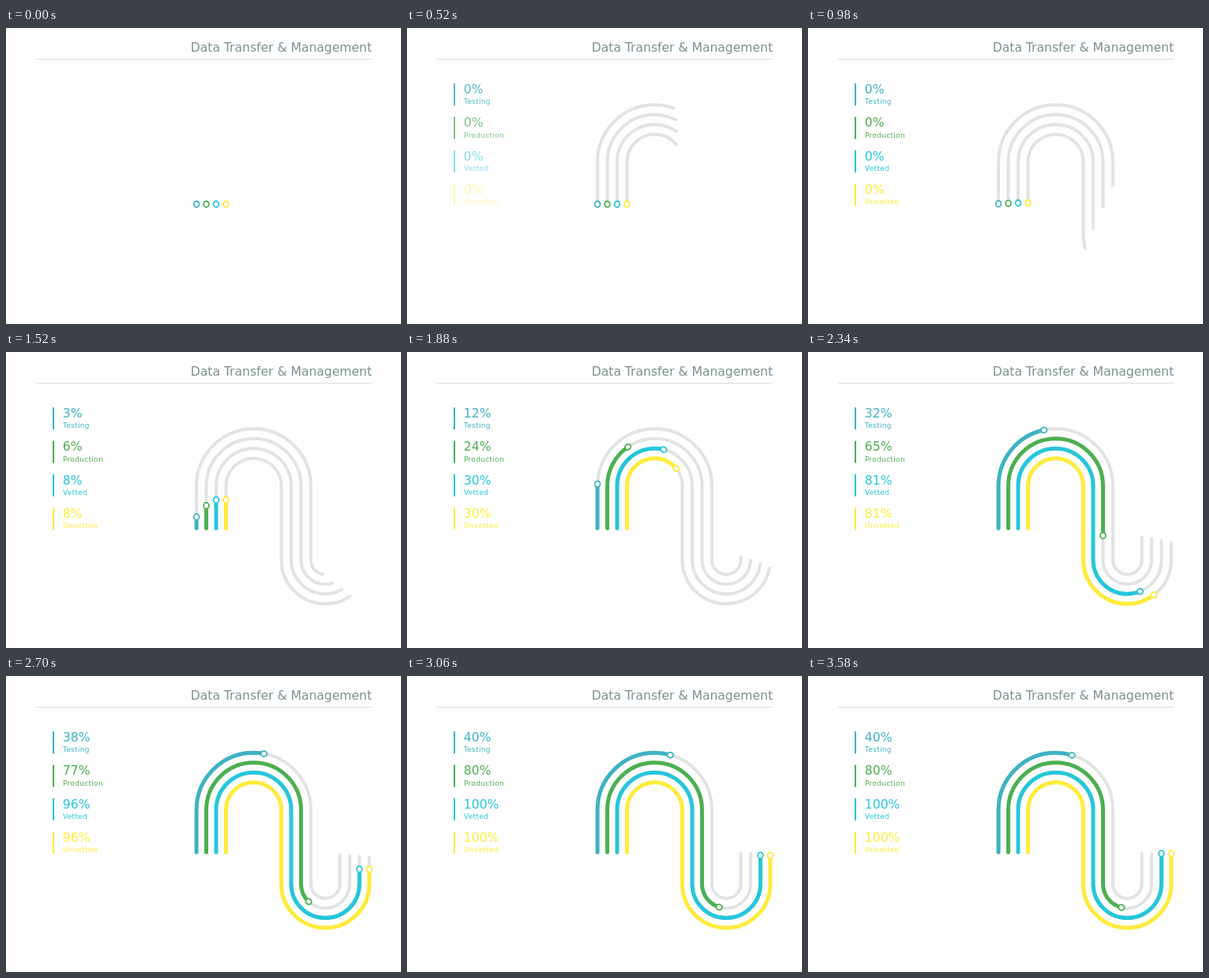
An HTML page with a canvas for the animation above (7740 ms loop, 500 by 375 pixels).

```html
<!DOCTYPE html>
<html lang="en">
<head>
<meta charset="utf-8">
<title>Data Transfer &amp; Management</title>
<style>
  html, body { margin: 0; width: 100%; height: 100%; overflow: hidden; background: #fefefe; }
  canvas, svg { position: absolute; left: 0; top: 0; width: 500px; height: 375px; }
  text { font-family: "DejaVu Sans", Verdana, sans-serif; }
  .title { font-size: 15.57px; fill: #7b918f; text-anchor: end; }
  .value { font-size: 15.6px; }
  .label { font-size: 9px; letter-spacing: .3px; }
</style>
</head>
<body>
<canvas id="stage" width="500" height="375"></canvas>
<svg id="legend" viewBox="0 0 500 375">
  <text class="title" x="463" y="30.3">Data Transfer &amp; Management</text>
  <rect x="38" y="39" width="425" height="1" fill="#dadddd"/>
</svg>
<script>
const LOOP = 7740;
const TRACK = '#e2e3e3';
const ITEMS = [
  { label: 'Testing', value: 40, color: '#3fb1c4' },
  { label: 'Production', value: 80, color: '#4caf50' },
  { label: 'Vetted', value: 100, color: '#26c6da' },
  { label: 'Unvetted', value: 100, color: '#ffeb3b' }
];

// Each pipe: up, over the top arc, down, through the bottom arc, up.
const TOP = { x: 313.5, y: 169.7 };
const BOTTOM = { x: 404.2, y: 263.4 };
const START_Y = 223.3, END_Y = 225, GAP = 12.45;

const ctx = document.getElementById('stage').getContext('2d');
const legend = document.getElementById('legend');

const clamp = x => Math.min(1, Math.max(0, x));
const cubicOut = x => 1 - (1 - x) ** 3;
const quintInOut = x => x < .5 ? 16 * x ** 5 : 1 - 16 * (1 - x) ** 5;

function svg(tag, attrs, parent, text = '') {
  const el = document.createElementNS('http://www.w3.org/2000/svg', tag);
  for (const key in attrs) el.setAttribute(key, attrs[key]);
  el.textContent = text;
  return parent.appendChild(el);
}

ITEMS.forEach((item, i) => {
  const y = i * 42.3;
  item.r1 = 72.4 - GAP * i;
  item.r2 = 18.3 + GAP * i;
  item.parts = [
    START_Y - TOP.y, Math.PI * item.r1, BOTTOM.y - TOP.y,
    Math.PI * item.r2, BOTTOM.y - END_Y
  ];
  item.total = item.parts.reduce((a, b) => a + b);

  item.group = svg('g', { fill: item.color }, legend);
  svg('rect', { x: 59, y: 70.3 + y, width: 2, height: 28 }, item.group);
  item.count = svg('text', { class: 'value', x: 71.8, y: 83.1 + y }, item.group);
  svg('text', { class: 'label', x: 72, y: 96.3 + y }, item.group, item.label);
});

function strokePipe({ r1, r2 }, length, color, width) {
  if (length <= 0) return;
  ctx.beginPath();
  ctx.moveTo(TOP.x - r1, START_Y);
  ctx.arc(TOP.x, TOP.y, r1, Math.PI, 0);
  ctx.arc(BOTTOM.x, BOTTOM.y, r2, Math.PI, 0, true);
  ctx.lineTo(BOTTOM.x + r2, END_Y);
  ctx.setLineDash([length, 2000]);
  ctx.lineCap = 'round';
  ctx.lineWidth = width;
  ctx.strokeStyle = color;
  ctx.stroke();
  ctx.setLineDash([]);
}

// Position and heading at a distance along the pipe.
function locate({ r1, r2, parts }, d) {
  const up = -Math.PI / 2;
  if (d < parts[0]) return [TOP.x - r1, START_Y - d, up];
  d -= parts[0];
  if (d < parts[1]) {
    const a = d / r1;
    return [TOP.x - r1 * Math.cos(a), TOP.y - r1 * Math.sin(a), a + up];
  }
  d -= parts[1];
  if (d < parts[2]) return [TOP.x + r1, TOP.y + d, -up];
  d -= parts[2];
  if (d < parts[3]) {
    const a = d / r2;
    return [BOTTOM.x - r2 * Math.cos(a), BOTTOM.y + r2 * Math.sin(a), -up - a];
  }
  return [BOTTOM.x + r2, BOTTOM.y - (d - parts[3]), up];
}

function drawHead(item, d) {
  const [x, y, angle] = locate(item, d);
  ctx.beginPath();
  ctx.ellipse(x, y, 3.8, 3.4, angle, 0, Math.PI * 2);
  ctx.fillStyle = '#fff';
  ctx.fill();
  ctx.lineWidth = 1.8;
  ctx.strokeStyle = item.color;
  ctx.stroke();
}

function render(t) {
  const p = quintInOut(clamp((t - 372) / 3350));
  ctx.clearRect(0, 0, 500, 375);

  ITEMS.forEach((item, i) => {
    const grown = cubicOut(clamp((t - 54 * i) / 3250));
    strokePipe(item, item.total * grown, TRACK, 4);
  });

  ITEMS.forEach((item, i) => {
    const d = item.total * item.value / 100 * p;
    strokePipe(item, d, item.color, 5);
    drawHead(item, d);
    item.count.textContent = Math.round(item.value * p) + '%';
    item.group.setAttribute('opacity', clamp((t + 10 - 100 * i) / 600));
  });
}

const begin = performance.now();
function tick() {
  render((performance.now() - begin) % LOOP);
  requestAnimationFrame(tick);
}
tick();
</script>
</body>
</html>
```
